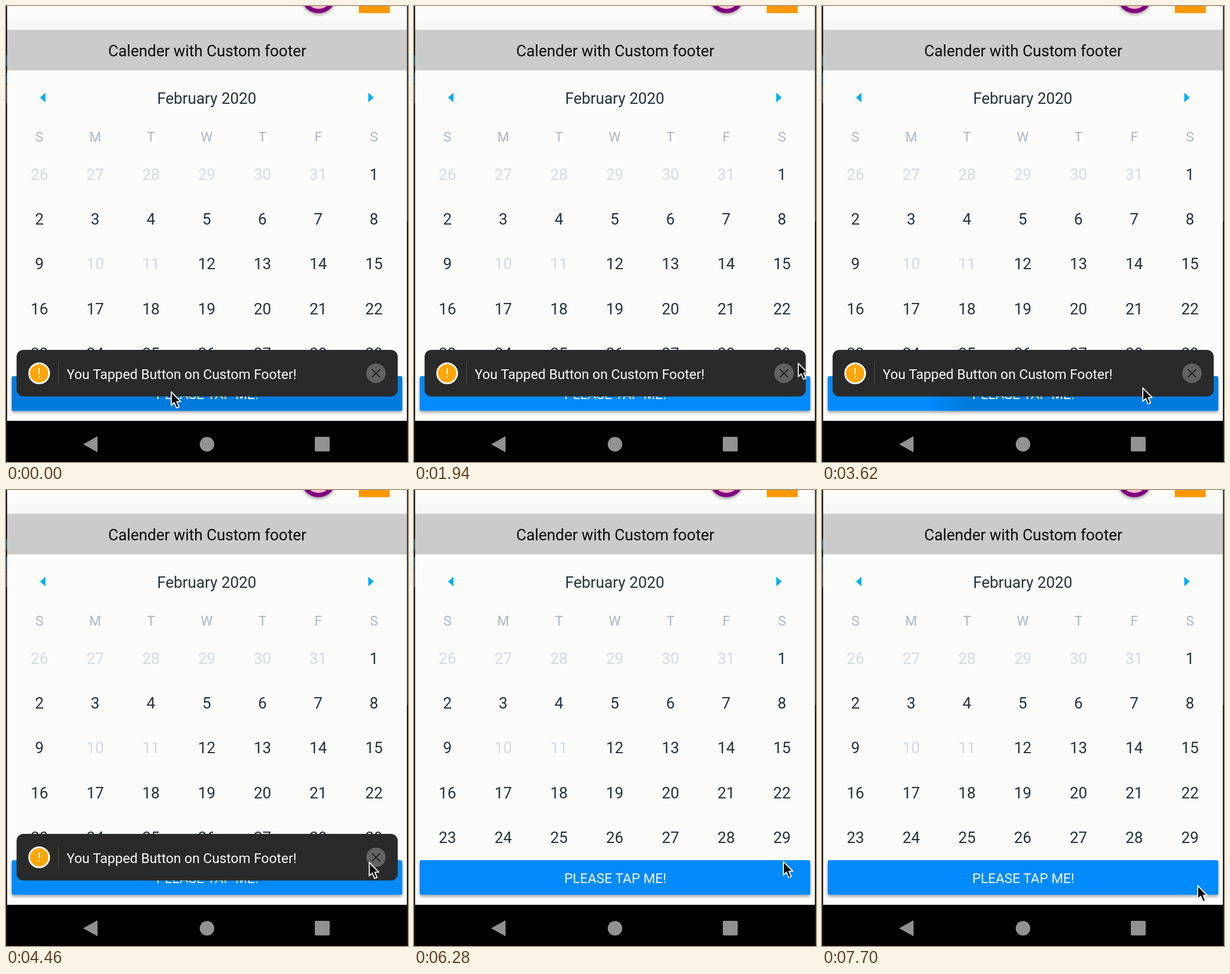
An HTML page for the animation above (7.72 s loop, 703x797 px).

```html
<!DOCTYPE html>
<html lang="en">
<head>
<meta charset="utf-8">
<title>Calendar with footer toast</title>
<style>
  html, body { margin: 0; width: 100%; height: 100%; overflow: hidden; background: #fcfcfa; }
  svg { display: block; width: 703px; height: 797px; font-family: Roboto, sans-serif; }
  .mid { text-anchor: middle; }
  .big { font-size: 27.2px; }
  .small { font-size: 23.6px; }
</style>
</head>
<body>
<svg viewBox="0 0 703 797">
  <defs>
    <filter id="shadow" x="-20%" y="-50%" width="140%" height="220%">
      <feDropShadow dx="0" dy="3" stdDeviation="2.5" flood-opacity=".35"/>
    </filter>
    <clipPath id="buttonClip"><rect x="10" y="647" width="683" height="60.5" rx="3"/></clipPath>
    <radialGradient id="rippleFill">
      <stop offset=".85" stop-color="#007bdd"/>
      <stop offset="1" stop-color="#007bdd" stop-opacity="0"/>
    </radialGradient>
  </defs>

  <rect width="703" height="797" fill="#fcfcfa"/>
  <rect y="25" width="703" height="16" fill="#f7f7f6"/>
  <circle cx="546.5" cy="-18.5" r="31" fill="#800080" filter="url(#shadow)"/>
  <circle cx="546.5" cy="-18.5" r="23.5" fill="#ffc0cb"/>
  <rect x="617" width="54" height="12.5" fill="#ff9800"/>
  <rect x="2" y="41.5" width="699" height="71" fill="#cbcbcb"/>
  <text class="mid big" x="352" y="88" fill="#0a0a0a">Calender with Custom footer</text>

  <g fill="#00adf0">
    <path d="M59.5 160L69 151.5V168.5Z"/>
    <path d="M643 160L633.5 151.5V168.5Z"/>
  </g>
  <text class="mid big" x="351" y="171" fill="#22343f">February 2020</text>
  <g id="calendar" class="mid"></g>

  <rect x="10" y="647" width="683" height="60.5" rx="3" fill="#028afa" filter="url(#shadow)"/>
  <circle id="ripple" clip-path="url(#buttonClip)" cy="674" fill="url(#rippleFill)"/>
  <text class="mid small" x="352" y="686.5" fill="#f4faff">PLEASE TAP ME!</text>

  <rect y="725" width="703" height="72" fill="#000"/>
  <g fill="#929292">
    <path d="M135 766L160 752V780Z"/>
    <circle cx="351.5" cy="766" r="12.7"/>
    <rect x="540" y="753" width="26" height="25.5" rx="2"/>
  </g>

  <rect width="2" height="797" fill="#15171b"/>
  <rect y="86" width="2" height="19" fill="#0d5c8c"/>
  <rect y="117" width="2" height="19" fill="#0d5c8c"/>
  <rect y="137" width="2" height="33" fill="#4a4a4a"/>
  <rect x="701" width="2" height="376" fill="#3c3d40"/>
  <rect x="701" y="376" width="2" height="421" fill="#15171b"/>

  <g id="toast">
    <rect x="18.5" y="601" width="666.5" height="81.5" rx="12" fill="#2a2a2a"/>
    <circle cx="58" cy="642" r="17.5" fill="#ffa600" stroke="#fff" stroke-width="3"/>
    <path d="M58 633V644M58 647.5V650" stroke="#fff" stroke-width="2"/>
    <path d="M91.5 623V661" stroke="#48463e" stroke-width="1.5"/>
    <text x="106" y="651.5" font-size="23.8" fill="#fafafa">You Tapped Button on Custom Footer!</text>
    <circle id="close" cx="647" cy="642" r="17"/>
    <path d="M640 635L654 649M654 635L640 649" stroke="#222" stroke-width="1.8"/>
  </g>

  <path id="cursor" d="M0 .5V24L5.2 19L9.4 28.5L13.6 26.7L9.6 17.4H16.5Z"
        fill="#000" stroke="#fff" stroke-width="1.8" stroke-linejoin="round"/>
</svg>
<script>
const LOOP = 7720;
const byId = id => document.getElementById(id);
const calendar = byId('calendar'), ripple = byId('ripple'), toast = byId('toast'),
      closeButton = byId('close'), cursor = byId('cursor');

function addLabel(text, column, y, fill, size) {
  const label = document.createElementNS('http://www.w3.org/2000/svg', 'text');
  const attributes = { x: 58.5 + column * 97.5, y, fill, class: size };
  for (const name in attributes) label.setAttribute(name, attributes[name]);
  label.textContent = text;
  calendar.append(label);
}

[...'SMTWTFS'].forEach((day, i) => addLabel(day, i, 237, '#abb8c5', 'small'));
for (let i = 0; i < 35; i++) {
  const day = i < 6 ? 26 + i : i - 5;
  const disabled = i < 6 || day === 10 || day === 11;
  addLabel(day, i % 7, 303.5 + Math.floor(i / 7) * 78.4, disabled ? '#d0dce5' : '#22343f', 'big');
}

const progress = (t, from, to) => Math.min(1, Math.max(0, (t - from) / (to - from)));
const smooth = p => p * p * (3 - 2 * p);

// time, x, y of the cursor tip
const cursorPath = [
  [0, 289, 674], [150, 289, 674], [800, 672, 624], [2250, 672, 624],
  [2660, 579.5, 665], [2900, 561, 667], [3850, 561, 667], [4600, 646, 648],
  [6253, 646, 649], [6700, 646, 649], [7300, 657, 691], [LOOP, 657, 691]
];

function cursorAt(t) {
  const i = cursorPath.findIndex(point => point[0] > t);
  const [from, x0, y0] = cursorPath[i - 1], [to, x1, y1] = cursorPath[i];
  const p = smooth(progress(t, from, to));
  return [x0 + (x1 - x0) * p, y0 + (y1 - y0) * p];
}

function recordedTime(t) {
  const within = t % 140;
  const step = within < 20 ? 0 : within < 120 ? 1 : 2;
  return t - within + step * 140 / 3;
}

function render(t) {
  cursor.setAttribute('transform', `translate(${cursorAt(t)})`);

  const firstToast = t < 3000;
  ripple.setAttribute('cx', firstToast ? 289 : 561);
  ripple.setAttribute('r', firstToast ? 700 : 720 * progress(t, 3400, 3775));
  ripple.setAttribute('opacity', 1 - (firstToast ? progress(t, 60, 450) : progress(t, 3850, 4200)));

  // The first toast times out, the second one is closed by a tap.
  const shown = firstToast
    ? 1 - progress(t, 2470, 2640)
    : progress(t, 3440, 3580) - progress(t, 5300, 5470);
  toast.setAttribute('opacity', shown);

  const pressed = progress(t, 5120, 5200) - progress(t, 5300, 5420);
  const grey = 98 + 40 * pressed;
  closeButton.setAttribute('fill', `rgb(${grey},${grey},${grey})`);
}

const start = performance.now();
function tick() {
  render(recordedTime((performance.now() - start) % LOOP));
  requestAnimationFrame(tick);
}
tick();
</script>
</body>
</html>
```
